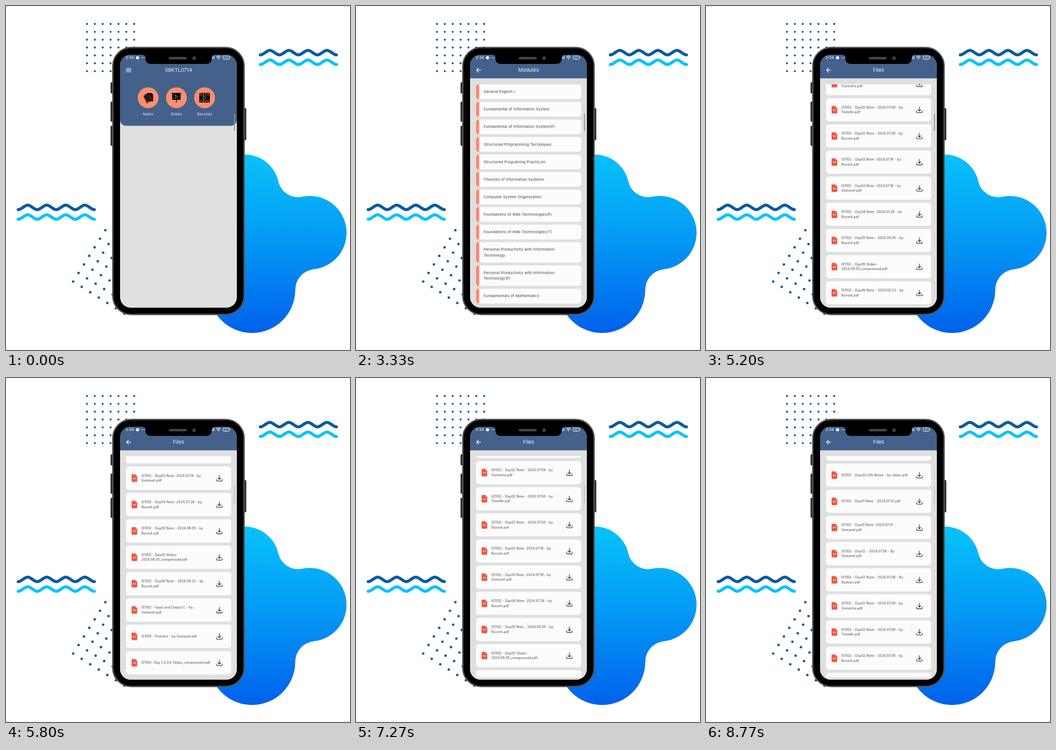
Animation of 748x748 px, one loop 8810 ms. Source, as an HTML page:

```html
<!DOCTYPE html>
<html lang="en">
<head>
<meta charset="utf-8">
<title>Course files app</title>
<style>
  html, body { margin: 0; width: 100%; height: 100%; overflow: hidden; background: #fff; }
  svg { display: block; width: 100vw; height: 100vh; }
  text { font-family: Inter, "Open Sans", sans-serif; }
  .title { font-size: 11px; fill: #f2f5f9; text-anchor: middle; letter-spacing: .05px; }
  .label { font-size: 8px; fill: #e9eef5; text-anchor: middle; letter-spacing: .25px; }
  .module { font-size: 8.1px; fill: #3f3f3f; letter-spacing: .22px; }
  .file { font-size: 7px; fill: #3f3f3f; letter-spacing: .2px; }
  .line { fill: none; stroke-linecap: round; stroke-linejoin: round; }

  /* One loop is 8810 ms: 1% = 88.1 ms */
  #modules, #files, #scroll, #stretch, #handle, #touch {
    animation: 8810ms linear infinite;
  }
  #modules { animation-name: open-modules; }
  #files { animation-name: open-files; }
  #scroll { animation-name: scroll; }
  #stretch { animation-name: stretch; transform-origin: 0 651px; }
  #handle { animation-name: dim; }
  #touch { animation-name: touch; }

  @keyframes open-modules {
    0%, 14.42% { opacity: 0; transform: translateY(24px); animation-timing-function: ease-out; }
    19.6%, 100% { opacity: 1; transform: none; }
  }
  @keyframes open-files {
    0%, 38.6% { opacity: 0; transform: translateY(24px); animation-timing-function: ease-out; }
    44.3%, 100% { opacity: 1; transform: none; }
  }
  @keyframes scroll {
    0%, 53.01% { transform: translateY(0); animation-timing-function: cubic-bezier(.25, .5, .6, .95); }
    59.02% { transform: translateY(-424.7px); animation-timing-function: ease-out; }
    62.77%, 63.22% { transform: translateY(-452px); animation-timing-function: cubic-bezier(.4, .2, .8, .8); }
    65.15%, 73.44% { transform: translateY(-599.6px); animation-timing-function: cubic-bezier(.25, .5, .5, 1); }
    82.52%, 83.65% { transform: translateY(-387.9px); animation-timing-function: cubic-bezier(.25, .5, .5, 1); }
    92.28%, 100% { transform: translateY(-98.1px); }
  }
  @keyframes stretch {
    0%, 65.15% { transform: scaleY(1); animation-timing-function: ease-out; }
    65.83% { transform: scaleY(1.0085); animation-timing-function: ease-out; }
    72.6%, 100% { transform: scaleY(1); }
  }
  @keyframes dim {
    0%, 63.22% { opacity: .9; }
    65.8%, 100% { opacity: .3; }
  }
  @keyframes touch {
    0%, 82% { opacity: 0; transform: translate(368px, 538px); animation-timing-function: step-end; }
    82.1%, 83.2% { opacity: 1; transform: translate(368px, 538px); animation-timing-function: step-end; }
    83.25%, 94.2% { opacity: 0; transform: translate(443px, 545px); animation-timing-function: step-end; }
    94.21% { opacity: 1; transform: translate(443px, 545px); }
    96.14% { opacity: 0; transform: translate(443px, 545px); animation-timing-function: step-end; }
    99.5%, 100% { opacity: 1; transform: translate(448.5px, 542px); }
  }
</style>
</head>
<body>
<svg viewBox="0 0 748 748">
  <defs>
    <linearGradient id="sea" gradientUnits="userSpaceOnUse" x1="535" y1="323" x2="535" y2="711">
      <stop offset="0" stop-color="#08c2fa"/>
      <stop offset=".45" stop-color="#049cf5"/>
      <stop offset="1" stop-color="#0061ec"/>
    </linearGradient>
    <clipPath id="screen"><rect x="248" y="106" width="254" height="550" rx="23"/></clipPath>
    <clipPath id="viewport"><rect x="261" y="170" width="229" height="481"/></clipPath>
    <path id="wave" class="line" stroke-width="6.4"/>
    <g id="back" class="line" stroke="#fff" stroke-width="1.4">
      <path d="M271.3 139.5H262.3M266.6 135L262.1 139.5L266.6 144"/>
    </g>
    <g id="pdf">
      <path d="M-4.6 -8.2H2.4L6.2 -4.4V6.4Q6.2 8.2 4.4 8.2H-4.4Q-6.2 8.2 -6.2 6.4V-6.6Q-6.2 -8.2 -4.6 -8.2Z" fill="#ec5945"/>
      <path d="M2.4 -8.2L6.2 -4.4H2.4Z" fill="#f7a79b"/>
      <text y="2.2" font-size="3.6" font-weight="700" fill="#fff" text-anchor="middle">PDF</text>
    </g>
    <path id="download" class="line" stroke="#222" stroke-width="1.25"
      d="M0 -6V2.8M-3.3 -.4L0 2.8L3.3 -.4M-6.2 2.6V4.6Q-6.2 6.2 -4.6 6.2H4.6Q6.2 6.2 6.2 4.6V2.6"/>
  </defs>

  <path fill="url(#sea)" d="M441 500L500 325L519 323A75 75 0 0 1 592.2 381.6A43.7 43.7 0 0 0 643.8 414.7
    A80 80 0 1 1 668.8 572.5A44.8 44.8 0 0 0 629 617A94 94 0 0 1 441 617Z"/>
  <g id="dots" fill="#0b5c9f"></g>
  <use href="#wave" x="553" y="106.3" stroke="#0b5c9f"/>
  <use href="#wave" x="553" y="127.3" stroke="#00c4ff"/>
  <use href="#wave" x="26.5" y="442.8" stroke="#0b5c9f"/>
  <use href="#wave" x="26.5" y="463.8" stroke="#00c4ff"/>

  <g fill="#2d2e30">
    <rect x="227.3" y="166" width="6" height="24" rx="2"/>
    <rect x="227.3" y="208" width="6" height="43.5" rx="2"/>
    <rect x="227.3" y="260.5" width="6" height="43.5" rx="2"/>
    <rect x="516.5" y="222" width="6" height="70" rx="2"/>
  </g>
  <rect x="232.3" y="90.3" width="285.4" height="580.4" rx="40" fill="#000" stroke="#505253" stroke-width="3"/>

  <g clip-path="url(#screen)">
    <g id="home">
      <rect x="248" y="106" width="254" height="550" fill="#e0e0e0"/>
      <rect x="248" y="90" width="254" height="170.5" rx="13" fill="#43618b"/>
      <path class="line" d="M261.3 135.8H271.8M261.3 139.5H271.8M261.3 143.2H271.8" stroke="#fff" stroke-width="1.3"/>
      <text class="title" x="375.3" y="143.3">58KTL0714</text>
      <g fill="#f88f6e">
        <circle cx="309" cy="199.5" r="22.7"/>
        <circle cx="370.5" cy="199.5" r="22.7"/>
        <circle cx="431.8" cy="199.5" r="22.7"/>
      </g>
      <g transform="translate(309 199.5)" stroke="#f88f6e" stroke-width=".6">
        <rect x="-8" y="-8" width="12" height="18" rx="1" transform="rotate(-22)"/>
        <rect x="-6" y="-9" width="12" height="18" rx="1" transform="rotate(-10)"/>
        <path d="M-3 -10.5H7.5L11 -7V8H-3Z"/>
        <path d="M-.6 -5H6M-.6 -2H8.6M-.6 1H8.6M-.6 4H8.6"/>
      </g>
      <g transform="translate(370.5 199.5)">
        <path d="M-10 -10.5H10V-8H9V4.5H-9V-8H-10Z"/>
        <path d="M-.5 4V8H.5V4Z"/>
        <circle cy="8.6" r="1.4"/>
        <path class="line" d="M-2.3 -5.8L3.2 -2.4L-2.3 1Z" stroke="#f88f6e"/>
      </g>
      <g transform="translate(431.8 199.5)">
        <rect x="-11.5" y="-10.5" width="23" height="21" rx="2"/>
        <path d="M-11 -8.2H11M-11 8.2H11" stroke="#f88f6e" stroke-width="2.4" stroke-dasharray="2 3.2" stroke-dashoffset="-2"/>
        <path d="M-11.5 -5.4H11.5M-11.5 5.4H11.5" stroke="#f88f6e" stroke-width=".7"/>
        <path class="line" d="M-2.6 -4L4 0L-2.6 4Z" stroke="#f88f6e"/>
      </g>
      <text class="label" x="309" y="238">Notes</text>
      <text class="label" x="370.5" y="238">Slides</text>
      <text class="label" x="431.8" y="238">Records</text>
    </g>

    <g id="modules">
      <rect x="248" y="106" width="254" height="550" fill="#dfdfdf"/>
      <rect x="248" y="80" width="254" height="77.3" fill="#43618b"/>
      <use href="#back"/>
      <text class="title" x="375.3" y="143.3">Modules</text>
      <g id="moduleList"></g>
    </g>

    <g id="files">
      <rect x="248" y="106" width="254" height="550" fill="#dfdfdf"/>
      <rect x="248" y="80" width="254" height="77.3" fill="#43618b"/>
      <use href="#back"/>
      <text class="title" x="375.3" y="143.3">Files</text>
      <g clip-path="url(#viewport)">
        <g id="stretch"><g id="scroll"></g></g>
      </g>
    </g>

    <rect id="handle" x="495.6" y="234" width="2.5" height="38" rx="1.2" fill="#959595"/>
    <g id="touch" opacity="0">
      <circle r="5.6" fill="#fff" fill-opacity=".75" stroke="#d3d3d3" stroke-width=".9"/>
    </g>

    <g id="status" fill="#eef2f7">
      <text x="260.3" y="115.2" font-size="8.1" font-weight="500">2:34</text>
      <circle cx="286" cy="112.4" r="3.5"/>
      <circle cx="295" cy="112.3" r=".9"/>
      <circle cx="298" cy="112.3" r=".9"/>
      <circle cx="301" cy="112.3" r=".9"/>
      <path d="M448 111H449.4V115.5H448ZM450 109.5H451.2V115.5H450ZM452 108.3H453.3V115.5H452Z" opacity=".75"/>
      <g class="line" stroke="#eef2f7" stroke-width="1.1">
        <path d="M457.4 110.6Q462 106.6 466.6 110.6M459 112.5Q462 110 465 112.5M460.6 114.2Q462 113 463.4 114.2"/>
        <rect x="472" y="108.8" width="13.4" height="6.8" rx="2.2"/>
        <path d="M487.2 111.3V113.1"/>
      </g>
      <circle cx="462" cy="115" r=".8"/>
      <text x="478.7" y="114.2" font-size="5" text-anchor="middle">87</text>
    </g>
  </g>

  <path d="M298 104H452V107Q447.5 107 447.5 111V113Q447.5 126 434 126H316.5Q303 126 303 113V111Q303 107 298 107Z"/>
  <rect x="354" y="110.8" width="39" height="5.2" rx="2.6" fill="#454545"/>
  <circle cx="409" cy="113.4" r="3.9" fill="#3d3d3d"/>
</svg>

<script>
const $ = id => document.getElementById(id);
const lines = (cls, x, y, step, rows) => rows
  .map((row, i) => `<text class="${cls}" x="${x}" y="${y + (i - (rows.length - 1) / 2) * step}">${row}</text>`)
  .join('');
const card = (y, h) => `<rect x="261" y="${y}" width="228.5" height="${h}" rx="6" fill="#fcfcfc"/>`;

$('wave').setAttribute('d', 'M0 0' + 'c7.55 0 13.2 -9.8 20.7 -9.8s13.2 9.8 20.7 9.8'.repeat(4));

// Two 7 x 7 dot grids: one upright, one turned
let dotMarkup = '';
for (let i = 0; i < 7; i++) {
  for (let j = 0; j < 7; j++) {
    dotMarkup += `<circle cx="${176 + 17.13 * i}" cy="${39 + 17.1 * j}" r="2.2"/>`;
    dotMarkup += `<circle cx="${216 - 11.65 * i + 18.55 * j}" cy="${487.5 + 18.6 * i + 11.65 * j}" r="2.7"/>`;
  }
}
$('dots').innerHTML = dotMarkup;

const moduleNames = [
  'General English I',
  'Fundamental of Information System',
  'Fundamental of Information System(P)',
  'Structured Programming Techniques',
  'Structured Programing Practicum',
  'Theories of Information Systems',
  'Computer System Organization',
  'Foundations of Web Technologies(P)',
  'Foundations of Web Technologies(T)',
  'Personal Productivity with Information|Technology',
  'Personal Productivity with Information|Technology(P)',
  'Fundamentals of Mathematics'
];
let nextY = 170.4;
$('moduleList').innerHTML = moduleNames.map(name => {
  const rows = name.split('|');
  const h = 32 + (rows.length - 1) * 12.4;
  const y = nextY;
  nextY += h + 6.13;
  return card(y, h)
    + `<path d="M268 ${y}H267Q261 ${y} 261 ${y + 6}V${y + h - 6}Q261 ${y + h} 267 ${y + h}H268Z" fill="#f88c6c"/>`
    + lines('module', 277.5, y + h / 2 + 2.8, 12.2, rows);
}).join('');

const fileNames = [
  ' - Arrays - by Gomavel',
  ' - Boolean - by Gomavel',
  ' - Day(02,04) Notes - by Jelavi',
  ' - Day01 Note - 2024.07.01',
  ' - Day01 Note -2024.07.01 -|Gomavel',
  ' - Day02 - 2024.07.08 - By|Gomavel',
  ' - Day02 Note - 2024.07.08 - By|Kodvari',
  ' - Day02 Note - 2024.07.08 - by|Vumesha',
  ' - Day02 Note - 2024.07.08 - by|Tomelki',
  ' - Day02 Note - 2024.07.08 - by|Buvork',
  ' - Day03 Note -2024.07.19 - by|Buvork',
  ' - Day03 Note -2024.07.19 - by|Gomavel',
  ' - Day04 Note -2024.07.26 - by|Buvork',
  ' - Day05 Note - 2024.08.05 - by|Buvork',
  ' - Day05 Slides-|2024.08.05_compressed',
  ' - Day06 Note - 2024.08.23 - by|Buvork',
  ' - Input and Output C - by|Gomavel',
  ' - Pointers - by Gomavel',
  '- Day 1,2,3,4 Slides_compressed'
];
$('scroll').innerHTML = fileNames.map((name, i) => {
  const y = 170.4 + i * 56.85;
  const mid = y + 25.3;
  return card(y, 50.5)
    + `<use href="#pdf" x="279.2" y="${mid}"/><use href="#download" x="464" y="${mid}"/>`
    + lines('file', 294.4, mid + 2.4, 10.4, `IS1102${name}.pdf`.split('|'));
}).join('');
</script>
</body>
</html>
```
